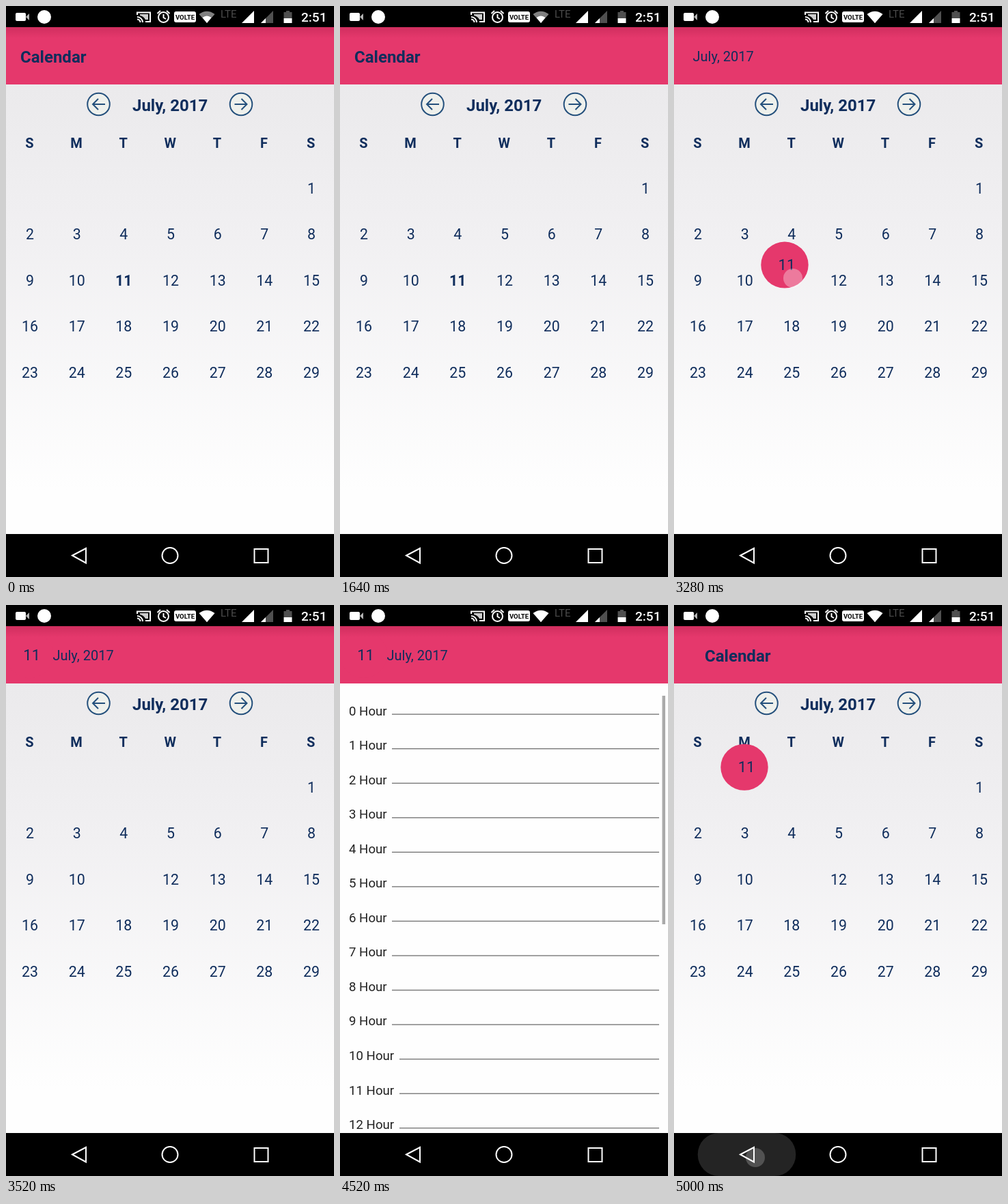
Animation, 480 px wide and 837 px high, one loop 5040 ms. Source, as an HTML page:

```html
<!DOCTYPE html>
<html lang="en">
<head>
<meta charset="utf-8">
<title>Calendar</title>
<style>
  html, body { margin: 0; width: 100%; height: 100%; overflow: hidden; background: #000; }
  svg { display: block; width: 480px; height: 837px; font-family: Roboto, sans-serif; }
  .navy { fill: #0f2d5c; }
  .bold { font-weight: 700; }
  .mid { text-anchor: middle; }
  .line { fill: none; stroke: #fff; stroke-width: 2; }
</style>
</head>
<body>
<svg viewBox="0 0 480 837">
  <defs>
    <linearGradient id="paper" x2="0" y2="1">
      <stop stop-color="#ebeaec"/><stop offset=".35" stop-color="#f1f0f2"/>
      <stop offset=".9" stop-color="#fefefe"/>
    </linearGradient>
    <linearGradient id="shade" x2="0" y2="1">
      <stop stop-color="#a01840" stop-opacity=".3"/><stop offset="1" stop-color="#a01840" stop-opacity="0"/>
    </linearGradient>
  </defs>

  <g id="calendar">
    <rect y="115" width="480" height="660" fill="url(#paper)"/>
    <text class="navy bold" x="185" y="154" font-size="24">July, 2017</text>
    <g fill="#eef0ec" stroke="#24507c" stroke-width="2">
      <circle cx="135.5" cy="144" r="16.3"/>
      <path d="M145 144H127M135 136L127 144L135 152"/>
      <circle cx="344" cy="144" r="16.3"/>
      <path d="M334.500 144H352.500M344.500 136L352.500 144L344.500 152" fill="none"/>
    </g>
    <g id="days" class="navy mid" font-size="21.33"></g>
  </g>

  <g id="hours" font-size="18.67" fill="#222">
    <rect y="115" width="480" height="660" fill="#fefefe"/>
    <rect x="471.500" y="133" width="4.500" height="335" fill="#aaa"/>
  </g>

  <rect y="31" width="480" height="84" fill="#e5386c"/>
  <text id="heading" class="navy bold" y="83" font-size="24">Calendar</text>
  <text id="month" class="navy" y="81" font-size="20">July, 2017</text>
  <g id="badge">
    <ellipse rx="34.700" ry="34" fill="#e5386c"/>
    <text class="navy mid" x="3" y="7.500" font-size="22">11</text>
  </g>
  <rect y="31" width="480" height="16" fill="url(#shade)"/>

  <rect width="480" height="31" fill="#000"/>
  <g fill="#fff">
    <rect x="14" y="10" width="15" height="12" rx="2"/>
    <path d="M29 16L34 11V21Z" opacity=".7"/>
    <circle cx="56" cy="16" r="10"/>
    <path class="line" d="M192 13V9.500H211V23H204M192 16a8 8 0 0 1 8 8M192 19.500a4.500 4.500 0 0 1 4.500 4.500"/>
    <path d="M196 12H208V20H204A12 12 0 0 0 196 14Z" opacity=".8"/>
    <circle class="line" cx="230.500" cy="16.500" r="7.500"/>
    <path class="line" d="M230.500 12V17L234 19M221.500 11L226 7M239.500 11L235 7"/>
    <rect x="246" y="8" width="32" height="16" rx="3"/>
    <text class="bold mid" x="262" y="19.500" font-size="9.500" fill="#000">VOLTE</text>
    <path id="wifi" d="M282.500 12Q294 3.500 305.500 12L294 25Z"/>
    <path d="M287.500 17Q294 12 300.500 17L294 25Z"/>
    <text x="314" y="17" font-size="15" fill="#4c4c4c">LTE</text>
    <path d="M345 25H363V7Z"/>
    <path d="M373 25H391V7Z" fill="#505050"/>
    <path d="M373 25H380V18Z"/>
    <path d="M406.500 9H410V7H415V9H418.500V18H406.500Z" fill="#505050"/>
    <path d="M406.500 18H418.500V25H406.500Z"/>
    <text x="432" y="23" font-size="19" font-weight="500">2:51</text>
  </g>

  <rect y="774" width="480" height="63" fill="#000"/>
  <rect id="ripple" y="774" height="63" rx="31" fill="#242424"/>
  <g class="line">
    <path d="M97 805.500L117 795V816.500Z"/>
    <circle cx="240" cy="805.500" r="11.500"/>
    <rect x="363.500" y="796" width="20" height="20"/>
  </g>
  <circle id="touch" r="14" fill="#fff"/>
</svg>

<script>
const LOOP = 5040, STEP = 40, MOVE = 300;
const TAP = 3080, OPEN = 3234, LIST = 3560, BACK = 4680, CLOSE = 4895;
const $ = id => document.getElementById(id);
const set = (el, attrs) => { for (const k in attrs) el.setAttribute(k, attrs[k]); return el; };
const add = (parent, tag, attrs, text = '') => {
  const el = set(document.createElementNS('http://www.w3.org/2000/svg', tag), attrs);
  el.textContent = text;
  return parent.appendChild(el);
};
const show = (id, on) => $(id).style.display = on ? '' : 'none';
const clamp = v => Math.max(0, Math.min(1, v));
const mix = (a, b, p) => a + (b - a) * p;

// cubic-bezier(.4, 0, .2, 1)
function ease(x) {
  let lo = 0, hi = 1, s;
  for (let i = 0; i < 20; i++) {
    s = (lo + hi) / 2;
    if (1.2 * s * (1 - s) ** 2 + 0.6 * s * s * (1 - s) + s ** 3 < x) lo = s; else hi = s;
  }
  return s * s * (3 - 2 * s);
}

[...'SMTWTFS'].forEach((name, i) =>
  add($('days'), 'text', { x: 34.5 + i * 68.6, y: 208, class: 'bold', 'font-size': 20 }, name));
let today;
for (let day = 1; day <= 29; day++) {
  const cell = day + 5;
  const el = add($('days'), 'text', {
    x: 35 + cell % 7 * 68.67, y: 275 + Math.floor(cell / 7) * 67.4
  }, day);
  if (day === 11) today = set(el, { class: 'bold' });
}

for (let h = 0; h <= 12; h++) {
  const y = 161.5 + h * 50.55;
  add($('hours'), 'text', { x: 13, y }, h + ' Hour');
  add($('hours'), 'rect', { x: h < 10 ? 76 : 87, y: y - 2, width: h < 10 ? 391 : 380, height: 1.3, fill: '#707070' });
}

function draw(t) {
  const moving = t >= OPEN, closing = t >= CLOSE;
  const out = ease(clamp((t - OPEN) / MOVE));
  const back = ease(clamp((t - CLOSE) / MOVE));
  const p = closing ? 1 - back : out;

  show('hours', t >= LIST && !closing);
  show('badge', moving);
  show('heading', !moving || closing);
  show('month', moving && !closing);
  today.style.display = moving ? 'none' : '';

  set($('badge'), { transform: `translate(${mix(171.5, 34.5, p)} ${mix(402.5, 73, p)})` });
  set($('heading'), { x: closing ? mix(21, 69, p) : 21 });
  set($('month'), { x: mix(24.5, 68.5, p) });
  set($('wifi'), { opacity: t < 3040 ? 0.5 : 1 });

  const onBack = t >= BACK;
  const fade = onBack ? 1 - clamp((t - 4840) / 400) : 1 - clamp((t - 3240) / 120);
  show('touch', t >= TAP && fade > 0);
  set($('touch'), { cx: onBack ? 119 : 174, cy: onBack ? 810 : 399, opacity: (onBack ? 0.35 : 0.5) * fade });

  const grow = 1 - (1 - clamp((t - BACK) / 280)) ** 2;
  const width = 143.5 * grow;
  show('ripple', onBack && grow > 0);
  set($('ripple'), { x: 106.5 - width / 2, width });
}

function tick(now) {
  const t = now % LOOP;
  draw(t - t % STEP);
  requestAnimationFrame(tick);
}
draw(0);
requestAnimationFrame(tick);
</script>
</body>
</html>
```
